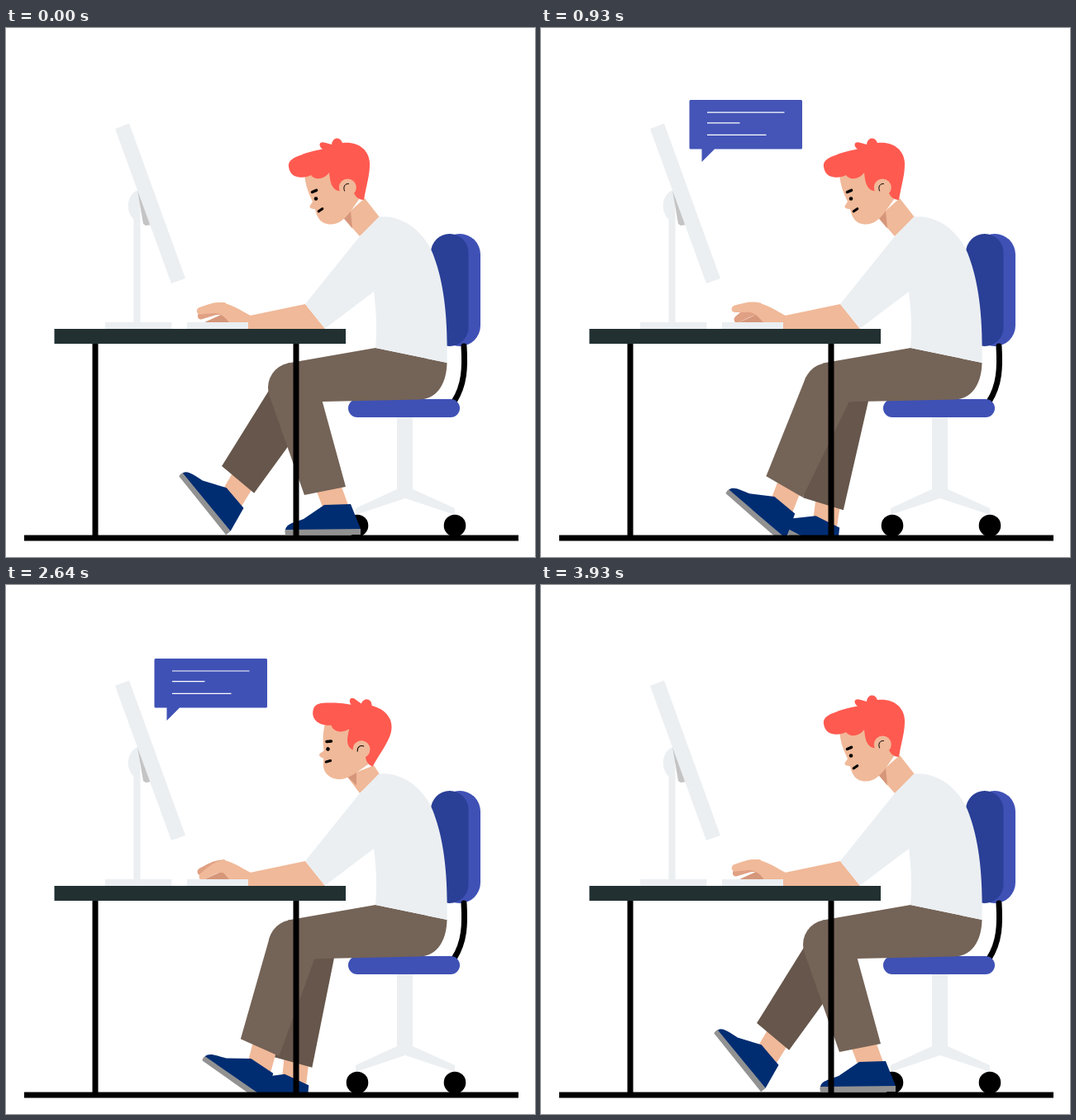
Write an HTML page that moves like this. It is 640x640 px and loops after 4 s.

```html
<!DOCTYPE html>
<html lang="en">
<head>
<meta charset="utf-8">
<title>Working at the desk</title>
<style>
html, body { margin: 0; width: 100%; height: 100%; overflow: hidden; background: #fff; }
svg { display: block; width: 100vw; height: 100vh; }
.pale { fill: #ebeff2; }
.blue { fill: #3f51b5; }
.skin { fill: #f0b999; }
.shade { fill: #d6967a; }
.near { fill: #746357; }
.far { fill: #66564b; }
.ink { fill: none; stroke: #000; stroke-linecap: round; }
</style>
</head>
<body>
<svg viewBox="0 0 640 640" xmlns="http://www.w3.org/2000/svg">
  <defs>
    <clipPath id="aboveFloor"><rect width="640" height="614"/></clipPath>
    <path id="shin" d="M318 443L361 565L411 555L374 420Z"/>
    <g id="foot">
      <path class="skin" d="M376 561L406 555L415 580L384 582Z"/>
      <path fill="#929292" d="M338 606H429V613H338Q336.500 609 338 606Z"/>
      <path fill="#002d72" d="M338 607C339 600 349 598 360 594L385 577L417 576L429 606Z"/>
    </g>
    <path id="finger" d="M266 332.500C252 330.500 246 334 234 337.500C229 339.500 230 346.500 235 346L248 345C256 344 261 346 270 356Z"/>
  </defs>

  <!-- monitor -->
  <path class="pale" d="M162 195C143 200 143 230 162 236Z"/>
  <rect class="pale" x="154.500" y="220" width="8" height="137"/>
  <path fill="#c5c4c4" d="M159 196L166 237L169 239L176 238Z"/>
  <path class="pale" d="M132 122L149 115.500L217 303L200 309Z"/>
  <rect class="pale" x="120" y="356" width="80.500" height="8"/>

  <!-- chair -->
  <rect class="blue" x="524" y="249" width="50" height="136" rx="25"/>
  <rect fill="#2a3f96" x="514" y="249" width="45.500" height="136" rx="22.700"/>
  <path class="ink" stroke-width="7" stroke-linecap="butt" d="M554 385C555.500 410 555 432 542 452"/>
  <path class="pale" d="M473 470H492V558L543 581V589L483 569L423 589V581L473 558Z"/>
  <circle cx="425" cy="602" r="13.300"/>
  <circle cx="543" cy="602" r="13.300"/>
  <rect class="blue" x="414" y="449" width="135" height="22" rx="11"/>

  <!-- legs -->
  <g clip-path="url(#aboveFloor)">
    <g id="farLeg"><use href="#foot"/><use href="#shin" class="far"/></g>
    <g id="nearLeg">
      <use href="#foot"/><use href="#shin" class="near"/>
      <circle class="near" cx="347" cy="435" r="30"/>
    </g>
    <path class="near" d="M447 387L533.500 405C533 431 521 449 500 449.500L383 452L366 453L347 440L341 405.500Z"/>
  </g>

  <!-- arm and hand -->
  <path class="skin" d="M362 334L295 348L288 364H386Z"/>
  <path class="shade" d="M271 357L262 346L238 357Z"/>
  <use id="farFinger" href="#finger" fill="#e0a083"/>
  <use id="nearFinger" href="#finger" class="skin"/>
  <path class="skin" d="M297 348.500C284 342 274 334.500 262 332.500L256 340L271 357L290 360Z"/>
  <rect class="pale" x="219" y="356" width="74" height="8.500"/>

  <!-- neck, shirt, head -->
  <path id="neck" class="skin"/>
  <path id="neckShade" class="shade"/>
  <path class="pale" d="M451 228.500L428 252L362 334L386 363.500L445 319C448 342 449 365 447 387L533.500 405C535 342 528 302 516 272C503 243 478 226 451 228.500Z"/>
  <g id="head">
    <path class="skin" d="M361 176C362 190 366 200 371 210L367.500 215.500C367 218 370 219 374 219C376 228 380 237.500 393 237.500C403 237.500 410 231 417 221.500L430 203L425 178L395 163Z"/>
    <path fill="#ff5a50" d="M342 168C341 158 352 155.500 364 151Q373 148 383 146.500C377 142 379 136 387 139L394 141C395 132 404 131 407 139C426 137 439 147 440 163C440.500 177 436 190 433 208Q425 208 421 200L402 197C394 195 392 186 391 175C384 184 373 184 369 178C360 182.500 344 183 342 168Z"/>
    <circle class="skin" cx="413.300" cy="193" r="10.500"/>
    <path class="ink" stroke-width="1" d="M409.500 197C407.500 192 410 188 414.500 188.500"/>
    <path class="ink" stroke-width="3.500" d="M370.500 198.500L375.500 196.300"/>
    <circle cx="375" cy="206.500" r="2.300"/>
    <path class="ink" stroke-width="3.200" d="M378.300 221.800L382.700 218.700"/>
  </g>

  <!-- desk -->
  <path d="M104.500 382h7v233h-7zM347.500 382h7v233h-7zM22 613.500h598v7h-598z"/>
  <rect fill="#223032" x="58.500" y="364" width="352.500" height="18"/>

  <g id="bubble">
    <path class="blue" d="M181 89H314.500Q316 89 316 90.500V147Q316 148.500 314.500 148.500H210L194.500 164V148.500H181Q179.500 148.500 179.500 147V90.500Q179.500 89 181 89Z"/>
    <path fill="none" stroke="#fff" stroke-width="1.200" d="M201 104H294.500M201 116.700H240.500M201 131.300H272.500"/>
  </g>
</svg>
<script>
const LOOP = 4000;
const KNEE = [347, 436], NECK = [405, 243.5], KNUCKLE = [264, 340];

// Each track is a list of [time, value], eased between neighbours.
const nearSwing = [[0, 0], [1140, 45.3], [2500, 36.3], [3930, 0]];
const farSwing = [[0, 0], [1140, 1], [2500, 1], [3930, 0]];
const headTurn = [[1990, 0], [2530, 20], [3200, 20], [3740, 0]];
const bubbleIn = [[602, 0], [967, 1], [2790, 1], [3205, 0]];
const nearTap = [[0, -1], [143, 1], [357, 16], [643, -22], [929, 4], [1000, -1]];
const farTap = [[0, -13], [143, -10], [357, -20], [643, -10], [929, -22], [1000, -13]];

const el = id => document.getElementById(id);
const set = (id, name, value) => el(id).setAttribute(name, value);
const mix = (a, b, u) => a + (b - a) * u;

function track(keys, t) {
  if (t <= keys[0][0]) return keys[0][1];
  for (let i = 1; i < keys.length; i++) {
    const [t0, a] = keys[i - 1], [t1, b] = keys[i];
    if (t < t1) {
      const u = (t - t0) / (t1 - t0);
      return mix(a, b, u * u * (3 - 2 * u));
    }
  }
  return keys[keys.length - 1][1];
}

function turn([x, y], [cx, cy], deg) {
  const r = deg * Math.PI / 180, c = Math.cos(r), s = Math.sin(r);
  return [cx + (x - cx) * c - (y - cy) * s, cy + (x - cx) * s + (y - cy) * c];
}

const spin = (id, deg, pivot, dx = 0, dy = 0) =>
  set(id, "transform", `translate(${dx} ${dy}) rotate(${deg} ${pivot})`);

function draw(t) {
  spin("nearLeg", track(nearSwing, t), KNEE);
  const f = track(farSwing, t);
  spin("farLeg", mix(51.3, 26, f), KNEE, mix(6, 20, f), mix(2.5, 13, f));

  const tilt = track(headTurn, t);
  spin("head", tilt, NECK);
  const back = turn([434, 206], NECK, tilt);
  const front = turn([417, 221], NECK, tilt);
  const chin = turn([408.5, 230], NECK, tilt);
  set("neck", "d", `M${back}L452 229L428 252L${chin}L${front}Z`);
  set("neckShade", "d", `M${chin}L${front}L${mix(419, 424, tilt / 20)} 242.5Z`);

  // The last typing cycle is a little shorter so the hand rests before the loop.
  const beat = t < 3000 ? t % 1000 : Math.min(1000, (t - 3000) / 0.929);
  spin("nearFinger", track(nearTap, beat), KNUCKLE);
  spin("farFinger", track(farTap, beat), KNUCKLE);

  const p = track(bubbleIn, t);
  set("bubble", "opacity", p);
  set("bubble", "transform", `translate(0 ${-69 * (1 - p)})`);
}

const start = performance.now();
function tick() {
  draw((performance.now() - start) % LOOP);
  requestAnimationFrame(tick);
}
tick();
</script>
</body>
</html>
```
